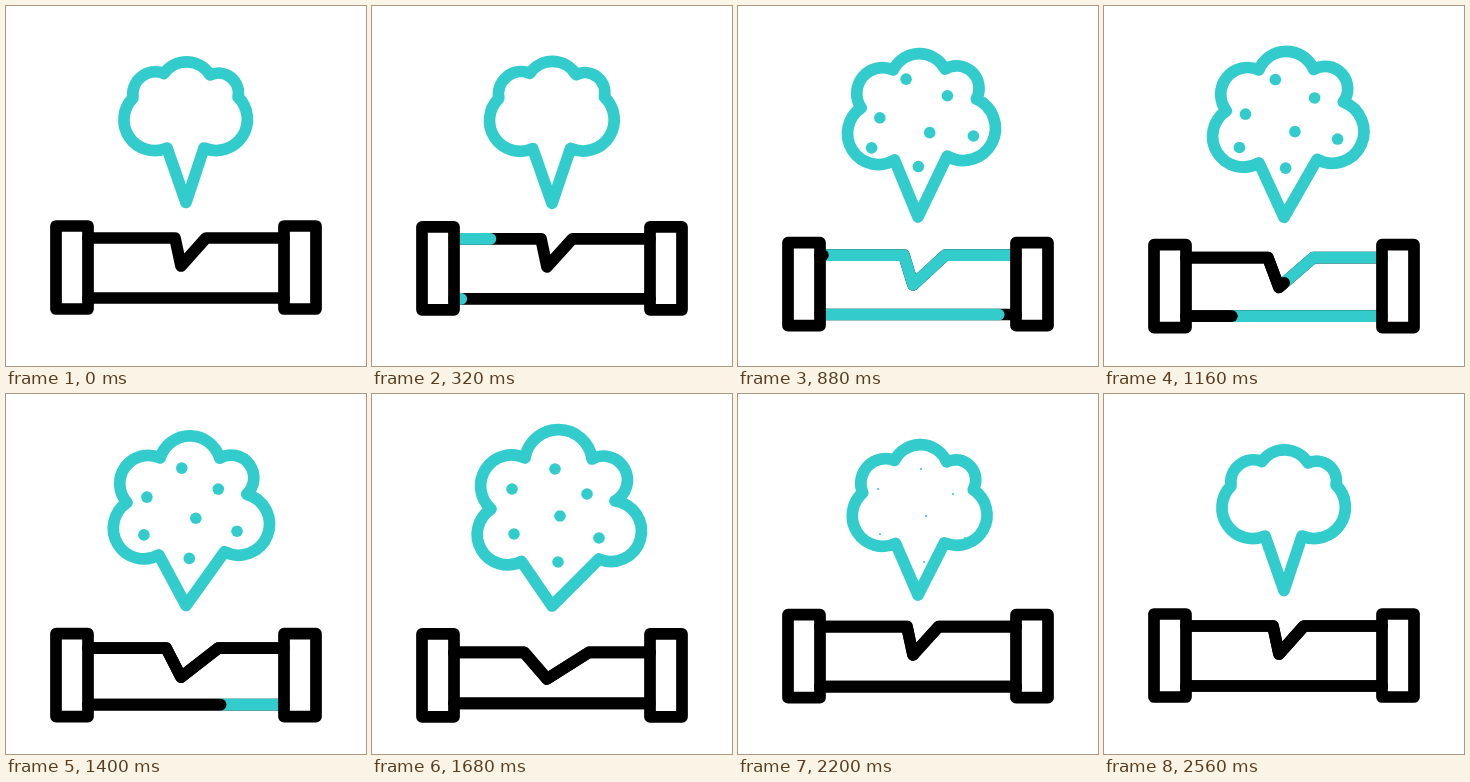
An HTML page that plays this animation: 360x360 px, repeating every 2600 ms.

```html
<!DOCTYPE html>
<html lang="en">
<head>
<meta charset="utf-8">
<title>Leaking pipe</title>
<style>
  html, body { margin: 0; height: 100%; overflow: hidden; background: #fff; }
  svg { display: block; width: 100%; height: 100%; }
  path { fill: none; stroke: #000; stroke-width: 11.7; stroke-linecap: round; stroke-linejoin: round; }
  .cyan { stroke: #33cccc; }
  circle { fill: #33cccc; }
</style>
</head>
<body>
<svg viewBox="0 0 360 360">
  <path id="cloud" class="cyan"/>
  <g id="dots"></g>
  <g id="lines"></g>
  <path id="flanges" d="M50 220H82V303H50ZM278 220H310V303H278Z"/>
</svg>
<script>
const LOOP = 2600, BURST = 270, PUFFED = 600, FULL = 1680;

// Cloud outline: tip height, then x, y of each joint and the bulge of the lobe after it
const REST = [196.5, 161, 142, .83, 127, 92, .58, 158, 67.5, .54, 204, 69, .62, 232, 91, .83, 198, 142];
const PUFF = [211, 157, 153, .98, 123.5, 101, .75, 155.5, 64, .6, 206, 63, .75, 238, 92, 1.05, 208, 149];
const WIDE = [212, 149.5, 167.5, .95, 119, 115, .87, 153, 64, .86, 220, 65, 1, 243, 107, 1.15, 227, 165];

// Each bubble drifts from one point to another
const BUBBLES = [
  [167, 73, 183, 75], [209, 89, 215, 100], [142, 113, 140, 95], [192, 127, 188, 122],
  [236, 129, 227, 144], [133, 142, 142, 140], [180, 160, 186, 168]
];

const $ = id => document.getElementById(id);
const add = (parent, tag) => parent.appendChild(document.createElementNS('http://www.w3.org/2000/svg', tag));
const setAll = (node, attrs) => Object.entries(attrs).forEach(([k, v]) => node.setAttribute(k, v));

const mix = (a, b, p) => a + (b - a) * p;
const mixAll = (a, b, p) => a.map((v, i) => mix(v, b[i], p));
const progress = (t, start, end) => Math.min(1, Math.max(0, (t - start) / (end - start)));
const smooth = (t, start, end) => (1 - Math.cos(Math.PI * progress(t, start, end))) / 2;
const easeOut = (t, start, end) => 1 - (1 - progress(t, start, end)) ** 2;

function cloudPath([tipY, x, y, ...lobes]) {
  let d = `M180 ${tipY}L${x} ${y}`;
  for (let i = 0; i < lobes.length; i += 3) {
    const [bulge, nextX, nextY] = lobes.slice(i, i + 3);
    const r = Math.hypot(nextX - x, nextY - y) * (1 + bulge * bulge) / (4 * bulge);
    d += `A${r} ${r} 0 ${+(bulge > 1)} 1 ${nextX} ${nextY}`;
    [x, y] = [nextX, nextY];
  }
  return d + 'Z';
}

// A pipe wall is a black line, the cyan flow on it, and black following the flow
function makeWall(start, duration) {
  const [base, flow, refill] = ['', 'cyan', ''].map(name => {
    const path = add($('lines'), 'path');
    setAll(path, { class: name, pathLength: 1 });
    return path;
  });
  const show = (path, d, from, to) => setAll(path, {
    d,
    display: to > from ? 'inline' : 'none',
    'stroke-dasharray': `${to - from} 2`,
    'stroke-dashoffset': -from
  });
  return (d, t) => {
    const head = smooth(t, start, start + duration);
    const tail = smooth(t, start + 678, start + 678 + duration);
    base.setAttribute('d', d);
    show(flow, d, tail, head);
    show(refill, d, 0, tail);
  };
}

const drawTop = makeWall(158, 627);
const drawBottom = makeWall(220, 818);
const bubbles = BUBBLES.map(() => add($('dots'), 'circle'));

function draw(t) {
  const puff = smooth(t, BURST, PUFFED);
  const rise = progress(t, PUFFED, FULL);
  const spread = rise ** 2;

  const swollen = mixAll(mixAll(REST, PUFF, puff), WIDE, spread);
  $('cloud').setAttribute('d', cloudPath(mixAll(swollen, REST, smooth(t, FULL, 2500))));

  // The pipe sinks and its crack opens, then both spring back faster than the cloud
  const recoil = 1 - easeOut(t, FULL, 2320);
  const drop = recoil * (14 * puff + 6 * easeOut(t, PUFFED, FULL));
  const open = recoil * mix(.38 * puff, 1, spread);
  const squeeze = open ** 3;
  const top = 232 + drop + 6.5 * squeeze;
  const bottom = 292 + drop - 2.6 * squeeze;
  drawTop(`M82 ${top}H${169 - 17 * open ** 2}L175 ${260 + drop + 5 * open}L${200 + 17 * open} ${top}H278`, t);
  drawBottom(`M82 ${bottom}H278`, t);
  $('flanges').setAttribute('transform', `translate(0 ${drop})`);

  const r = 5.8 * (smooth(t, 370, 580) - smooth(t, 2050, 2260));
  BUBBLES.forEach(([x, y, endX, endY], i) =>
    setAll(bubbles[i], { cx: mix(x, endX, spread), cy: mix(y, endY, spread), r }));
}

const begin = performance.now();
function tick() {
  draw((performance.now() - begin) % LOOP);
  requestAnimationFrame(tick);
}
tick();
</script>
</body>
</html>
```
